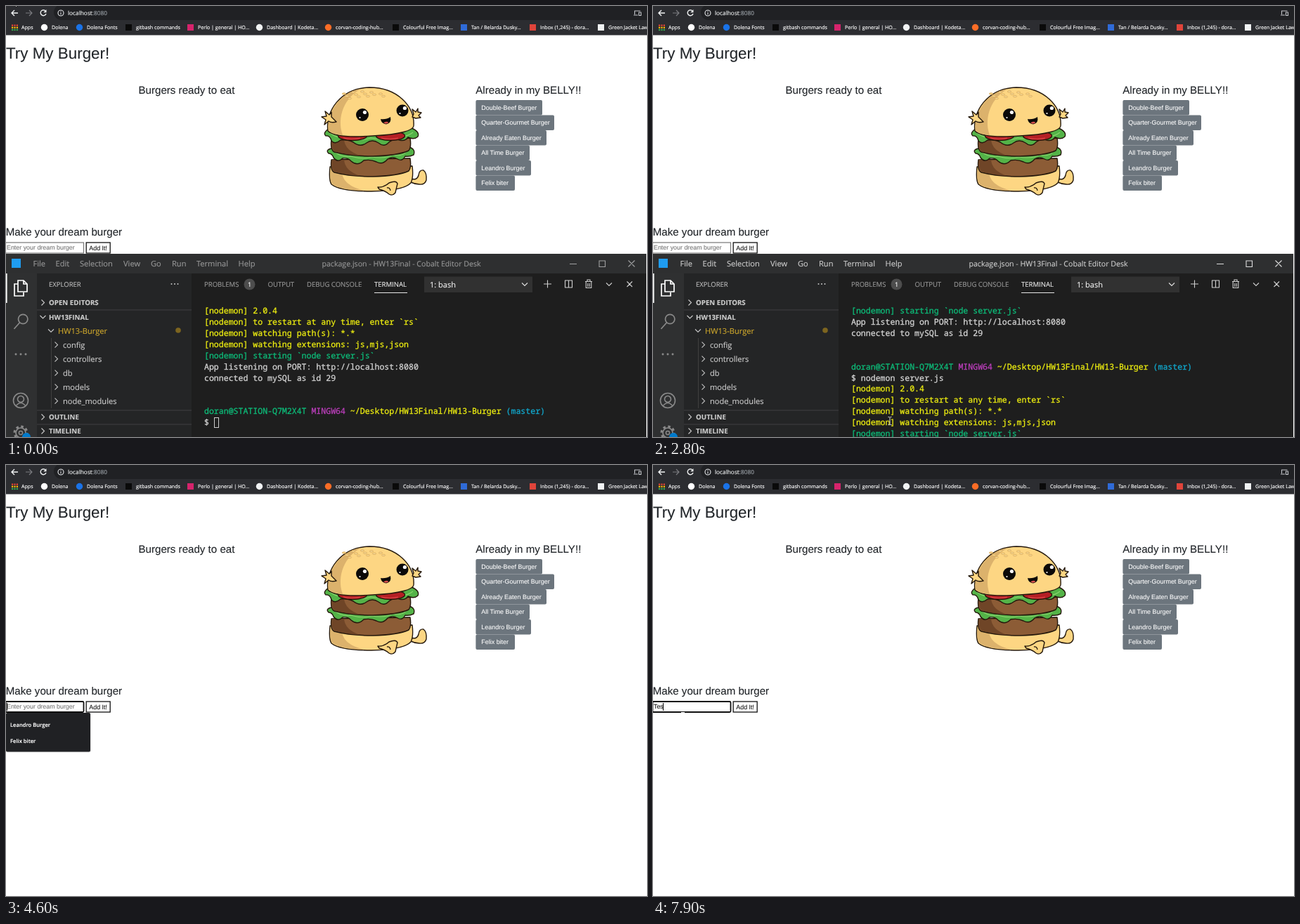
An HTML page that plays this animation: 912x614 px, repeating every 8000 ms.

```html
<!DOCTYPE html>
<html lang="en">
<head>
<meta charset="utf-8">
<title>Burger list</title>
<style>
html, body { margin: 0; width: 100%; height: 100%; overflow: hidden; background: #fff; }
svg { display: block; width: 912px; height: 614px; }
text { white-space: pre; text-rendering: geometricPrecision; }
text, tspan { fill: currentColor; stroke: currentColor; }
.a { font-family: "Liberation Sans", Arial, sans-serif; stroke-width: .1; }
.u { font-family: "Open Sans", "Noto Sans", sans-serif; stroke-width: .15; }
.m { font-family: "Noto Sans Mono", monospace; stroke-width: .3; }
.l { fill: none; stroke-width: 1.1; }
</style>
</head>
<body>
<svg id="stage" viewBox="0 0 912 614"></svg>
<script>
const text = (cls, x, y, size, color, str, more = '') =>
  `<text class="${cls}" x="${x}" y="${y}" font-size="${size}" color="${color}" ${more}>${str}</text>`;
const rect = (x, y, w, h, fill, more = '') =>
  `<rect x="${x}" y="${y}" width="${w}" height="${h}" fill="${fill}" ${more}/>`;
const dot = (x, y, r, fill, more = '') => `<circle cx="${x}" cy="${y}" r="${r}" fill="${fill}" ${more}/>`;
const line = (d, stroke, width = 1.1) => `<path class="l" d="${d}" stroke="${stroke}" style="stroke-width:${width}"/>`;
const shape = (d, fill, more = '') => `<path d="${d}" fill="${fill}" ${more}/>`;
const right = (x, y, c) => line(`M${x - 2} ${y - 4}l4 4l-4 4`, c);
const down = (x, y, c) => line(`M${x - 4} ${y - 2}l4 4l4 -4`, c);

const NAMES = ['Leandro Burger', 'Felix biter'];

function browser() {
  const marks = [
    [65, 'Dolena', 'c#fff'], [115, 'Dolena Fonts', 'c#1a73e8'], [185, 'gitbash commands', 's#0a0a0a'],
    [273, 'Perlo | general | HO...', 's#d6246c'], [371, 'Dashboard | Kodeta...', 'c#f1f3f4'],
    [469, 'corvan-coding-hub...', 'c#fc6d26'], [565, 'Colourful Free Imag...', 's#0a0a0a'],
    [662, 'Tan / Belarda Dusky...', 's#2f6bd8'], [760, 'Inbox (1,245) - dora...', 's#e0443a'],
    [857, 'Green Jacket Law', 's#f1f3f4']];
  let s = rect(0, 0, 912, 41, '#2c2d31') + rect(0, 41, 912, 1, '#8a8b8d') + rect(68, -2, 870, 22, '#202124', 'rx="11"');
  s += line('M17 10H8.5M12 6L8 10l4 4', '#f1f3f4', 1.4);
  s += line('M28 10h8.5M33 6l4 4l-4 4', '#7d7e82');
  s += line('M56.3 7.2A4 4 0 1 0 57 11', '#f1f3f4', 1.4) + shape('M57.5 5v4.2h-4.2z', '#f1f3f4');
  s += line('M74 10a4 4 0 1 0 8 0a4 4 0 1 0 -8 0M78 9.5v2.7M78 7.5v1', '#e8eaed');
  s += text('u', 88, 13.2, 8.3, '#f1f3f4', 'localhost<tspan color="#9aa0a6">:8080</tspan>');
  s += line('M894.5 12V7h8M893 13h6M900.5 9h3v4.5h-3z', '#c4c6ca');
  const hues = ['#ea4335', '#fbbc04', '#34a853'];
  for (let i = 0; i < 9; i++) {
    const row = i / 3 | 0;
    s += rect(8 + i % 3 * 3.4, 26.5 + row * 3.2, 2.2, 2.2, hues[row]);
  }
  s += text('u', 22, 33, 7.1, '#fff', 'Apps');
  for (const [x, label, icon] of marks) {
    const c = icon.slice(1);
    s += icon[0] == 'c' ? dot(x - 10.5, 30.5, 4.7, c) : rect(x - 15, 26, 9, 9, c);
    s += text('u', x, 33, 7.1, '#fff', label);
  }
  return s;
}

function burger() {
  const ink = '#24180c', tan = '#fdd683', shade = '#dcb26c';
  const o = `stroke="${ink}" stroke-width="1.4" stroke-linejoin="round" stroke-linecap="round"`;
  const patty = y => shape(`M463 ${y}Q461 ${y + 15} 467 ${y + 18}Q490 ${y + 24} 522 ${y + 24}Q558 ${y + 23} 573 ${y + 16}Q577 ${y + 11} 575 ${y - 2}Z`, '#8c5c36', o)
    + shape(`M464 ${y}Q462 ${y + 14} 468 ${y + 17}Q484 ${y + 22} 504 ${y + 23}Q482 ${y + 16} 481 ${y}Z`, '#6f4527');
  let s = shape('M576 246Q585 249 587 241Q588 233 594 234Q599 238 598 248Q596 255 588 254Q582 254 576 251Z', tan, o);
  s += shape('M461 229Q459 248 463 254Q475 264 520 264Q566 263 576 252Q580 244 578 228Z', tan, o);
  s += shape('M462 231Q460 247 464 253Q474 262 510 263Q480 256 478 238Z', shade);
  s += shape('M529 258Q537 259 545 252Q555 248 557 253Q555 261 554 266Q550 271 545 268Q539 263 531 261Z', tan, o);
  s += line('M542 259q4 -1 5 4', ink, 1.3);
  s += patty(219);
  s += shape('M463 203Q454 205 459 210Q464 210 466 216Q472 224 479 217Q487 216 491 221Q500 229 509 220Q519 218 527 222Q536 227 543 218Q550 214 557 218Q564 222 568 214Q574 215 580 212Q583 204 574 201Z', '#54b348', o);
  s += line('M468 208q10 8 22 6q18 5 30 1q20 3 30 -3q14 3 20 -5', '#8bd46f');
  s += patty(190);
  s += shape('M460 174Q450 181 455 185Q461 184 463 192Q468 198 476 191Q486 190 494 194Q504 202 513 195Q521 189 530 195Q538 202 545 194Q552 188 560 191Q568 193 572 187Q581 191 586 186Q589 179 577 174Z', '#54b348', o);
  s += line('M461 181q11 8 24 7q20 5 34 0q22 4 36 -3q14 3 24 -5', '#8bd46f');
  for (const x of [493, 547]) s += `<ellipse cx="${x}" cy="185" rx="20.5" ry="6.5" fill="#b51f24" ${o}/>` + line(`M${x - 13} 188q12 3 24 0`, '#e0484a');
  s += shape('M458 178C454 150 476 117 517 116C557 116 582 143 580 171C579 177 562 183 522 185C494 187 466 186 458 178Z', tan, o);
  s += shape('M459 177C456 152 476 122 505 118C482 130 470 158 479 184Q465 183 459 177Z', shade);
  for (let i = 0; i < 13; i++) {
    const row = i / 5 | 0, x = 481 + i % 5 * 13 + row * 4, y = 125 - 3 * Math.sin(i % 5 * .8) + row * 3.3;
    s += `<ellipse cx="${x}" cy="${y}" rx="2.7" ry="1.2" fill="#f8dc98" stroke="#d5a352" stroke-width=".7"/>`;
  }
  s += shape('M470 165Q463 167 459 164L453 169L455 162L449 158L456 157L454 150L460 155L463 151L463 158Z', tan, o);
  s += shape('M578 158L580 154L578 147L583 151L586 146L586 151L591 152L587 156L590 159L583 160Z', tan, o);
  for (const [x, y, r] of [[507, 155, 9], [564, 149, 8.5]])
    s += dot(x, y, r, '#0b0908') + dot(x + 3.4, y - 3.5, 2.6, '#fff') + dot(x - 3.5, y + 4, 1.1, '#fff');
  s += shape('M533 161Q541 162 547 158Q549 167 541 168.5Q534 168 533 161Z', '#0b0908');
  return s + shape('M537 166.5q4 -3 7.5 -.5q-4 3 -7.5 .5z', '#d7504c');
}

function page() {
  const eaten = [['Double-Beef Burger', 95], ['Quarter-Gourmet Burger', 112], ['Already Eaten Burger', 101],
    ['All Time Burger', 77], [NAMES[0], 79], [NAMES[1], 56]];
  const heading = (x, y, str, size = 15.12) => text('a', x, y, size, '#212529', str);
  let s = heading(0, 75, 'Try My Burger!', 22.4) + heading(188.5, 124.5, 'Burgers ready to eat')
    + heading(668.3, 124.5, 'Already in my BELLY!!') + heading(-.3, 326.5, 'Make your dream burger');
  eaten.forEach(([name, w], i) => {
    const y = 134 + 21.5 * i;
    s += rect(668.4, y, w - .4, 21.5, '#6c757d', 'rx="2"') + text('a', 676.3, y + 13.9, 8.95, '#fff', name);
  });
  s += burger();
  s += rect(-.5, 337, 111, 15, '#fff', 'id="field"');
  s += text('a', 1, 347.3, 8.9, '#757575', '', 'id="entry"');
  s += rect(1, 339, 1, 11, '#000', 'id="caret"');
  return s + rect(114.2, 337, 34, 15, '#fff', 'stroke="#111" stroke-width="1.3"') + text('a', 118.3, 347.5, 8.9, '#111', 'Add It!');
}

function popup() {
  return `<g id="popup">${rect(0, 353, 120.5, 56.3, '#000', 'opacity=".2" rx="2"')}${rect(0, 353, 120, 55.5, '#202124', 'rx="2"')}`
    + rect(0, 381, 120, 23, '#4a4b4e', 'id="hover"')
    + NAMES.map((n, i) => text('u', 6, 372.7 + 22.8 * i, 7.6, '#fff', n, 'font-weight="600"')).join('') + '</g>';
}

function termLines() {
  const c = (color, s) => `<tspan color="${color}">${s}</tspan>`;
  const Y = '#eded10', G = '#0dbc79';
  const run = id => ['2.0.4', 'to restart at any time, enter `rs`', 'watching path(s): *.*', 'watching extensions: js,mjs,json']
    .map(s => c(Y, '[nodemon] ' + s))
    .concat(c(G, '[nodemon] starting `node server.js`'), 'App listening on PORT: http://localhost:8080', 'connected to mySQL as id ' + id);
  const prompt = c(G, 'doran@STATION-Q7M2X4T ') + c('#bc3fbc', 'MINGW64 ') + c(Y, '~/Desktop/HW13Final/HW13-Burger ') + c('#11a8cd', '(master)');
  return [...run(29), '', '', prompt, '$ <tspan id="command">nodemon server.js</tspan>', ...run(30)];
}

const ROW = 15.87, CHAR = 6.94;

function editor() {
  const grey = '#8a8a8a', lite = '#ccc';
  let s = rect(0, 353, 911, 261, '#1e1e1e') + rect(0, 353, 911, 28, '#2e2f30') + rect(0, 381, 44, 233, '#2f3031')
    + rect(44, 381, 220, 233, '#242526') + rect(8, 360, 13, 13, '#1f9cf0');
  s += '<g id="titlebar">';
  [['File', 38.5], ['Edit', 70.5], ['Selection', 105], ['View', 167], ['Go', 206], ['Run', 236], ['Terminal', 271], ['Help', 330.5]]
    .forEach(([w, x]) => s += text('u', x, 371.3, 11.1, lite, w));
  s += text('u', 562.5, 371.2, 10.6, lite, 'package.json - HW13Final - Cobalt Editor Desk', 'text-anchor="middle"');
  s += line('M802 367.5h10M844 363h8.5v8.5h-8.5zM885.5 362.5l9 9M894.5 362.5l-9 9', '#ddd') + '</g>';

  s += rect(0, 381, 1.6, 42, '#fff');
  s += line('M17 391h8l5 5v11h-13zM17 396h-5v17h13v-5M25 391v5h5', '#fff', 1.7);
  s += line('M17.5 446a6.7 6.7 0 1 0 13.4 0a6.7 6.7 0 1 0 -13.4 0M19.5 451l-8 9', grey, 1.7);
  for (const x of [14, 21, 28]) s += dot(x, 496, 1.5, grey);
  s += line('M10.5 562a10.5 10.5 0 1 0 21 0a10.5 10.5 0 1 0 -21 0M16.5 560a4.5 4.5 0 1 0 9 0a4.5 4.5 0 1 0 -9 0M14 570q7 -9 14 0', grey, 1.6);
  const ring = (r, w, more = '') => dot(21, 608, r, 'none', `stroke="${grey}" stroke-width="${w}" ${more}`);
  s += ring(7, 1.7) + ring(9, 3, 'stroke-dasharray="3.5 3.57"') + ring(2.6, 1.5) + dot(29, 614, 6, '#007acc');

  s += text('u', 61, 399.7, 9.5, '#bbb', 'EXPLORER');
  for (const x of [235.5, 240, 244.5]) s += dot(x, 396, 1, '#c5c5c5');
  for (const y of [432.5, 575.5, 595.5]) s += rect(44, y, 220, 1, '#414142');
  [['OPEN EDITORS', 422.5], ['HW13FINAL', 443], ['OUTLINE', 585.5], ['TIMELINE', 605.5]].forEach(([w, y], i) =>
    s += (i == 1 ? down : right)(52.5, y, lite) + text('u', 61, y + 3.6, 9.75, lite, w, 'font-weight="700"'));
  s += down(64, 462.5, '#c5c5c5') + text('u', 74, 466.5, 11.1, '#cca62c', 'HW13-Burger') + dot(245, 462, 3.8, '#7d651f');
  s += rect(64, 473, 1, 100, '#404040');
  ['config', 'controllers', 'db', 'models', 'node_modules'].forEach((w, i) =>
    s += right(71.5, 482.7 + 20 * i, '#c5c5c5') + text('u', 81, 486.7 + 20 * i, 11.1, lite, w));

  [['PROBLEMS', 282], ['OUTPUT', 372.5], ['DEBUG CONSOLE', 428], ['TERMINAL', 524]].forEach(([w, x], i) =>
    s += text('u', x, 399.8, 9.55, i == 3 ? '#e7e7e7' : '#969696', w));
  s += dot(346.5, 396.5, 8, '#4d4d4d') + text('u', 346.5, 399.8, 9, '#fff', '1', 'text-anchor="middle"');
  s += rect(524, 408, 47, 1, '#e7e7e7') + rect(595, 385.5, 154, 22.5, '#313131') + text('u', 603, 400.5, 11, '#f0f0f0', '1: bash');
  s += down(738, 396.5, '#e0e0e0') + down(858, 396.5, lite);
  s += line('M770.5 390.5v11M765 396h11M795.5 391h10v10h-10zM800.5 391v10M883.5 392.5l7.5 7.5M891 392.5l-7.5 7.5', '#d0d0d0');
  s += line('M824 392.5h10M827 392v-2h4v2M825.2 393v8.5h7.6v-8.5M827.8 395v5M830.2 395v5', '#d0d0d0');

  s += '<clipPath id="view"><rect x="264" y="427" width="647" height="187"/></clipPath><g clip-path="url(#view)"><g id="log">'
    + termLines().map((l, i) => text('m', 282, 438.3 + ROW * i, CHAR / .6, '#d4d4d4', l)).join('')
    + '</g>' + rect(0, 0, CHAR, 15, '#ccc', 'id="block"') + '</g>';
  return s;
}

const stage = document.getElementById('stage');
stage.innerHTML = rect(0, 0, 912, 614, '#fff') + page() + browser() + `<g id="editor">${editor()}</g>` + popup()
  + rect(40, 352, 5, 1.2, '#fff', 'id="trace"')
  + '<path id="arrow" d="M0 0V10L2.3 7.9L4 11.6L5.6 11L4 7.3H7.2Z" fill="#fff" stroke="#000" stroke-width=".8"/>'
  + '<path id="beam" d="M-2.5 -5.5h2M.5 -5.5h2M0 -5v10.5M-2.5 5.5h2M.5 5.5h2" fill="none" stroke-width="1"/>';

const $ = id => document.getElementById(id);
const show = (id, on) => $(id).style.display = on ? '' : 'none';
const set = (id, attrs) => { for (const k in attrs) $(id).setAttribute(k, attrs[k]); };
const outRows = [...$('log').children].slice(11);

const clamp = p => Math.max(0, Math.min(1, p));
const mix = (a, b, p) => a.map((v, i) => v + (b[i] - v) * p);
const curve = (a, c, b, p) => mix(mix(a, c, p), mix(c, b, p), p);

// Pointer position, or null while it is hidden
function pointer(t) {
  const shell = [337, 591], field = [79, 342], pick = [61, 388];
  if (t < 3400) {
    const p = clamp((t - 200) / 800);
    return mix([10, -10], shell, p * p * (3 - 2 * p));
  }
  if (t < 4300) return curve(shell, [-110, 180], field, (t - 3300) / 900);
  if (t < 5000 || t >= 7500) return null;
  if (t < 6300) return mix([76, 345], pick, clamp((t - 4900) / 400));
  return mix(pick, [42, 347], clamp((t - 6200) / 300));
}

function draw(ms) {
  const t = Math.floor(ms / 100) * 100, editing = t < 4600;
  const focused = t >= 1100;
  show('editor', editing);
  set('titlebar', { opacity: focused ? 1 : .65 });
  show('command', t >= 1700);
  set('log', { transform: `translate(0 ${-ROW * (t < 2800 ? 0 : t < 3100 ? 4 : 7)})` });
  outRows.forEach(r => r.style.display = t >= 2800 ? '' : 'none');
  const row = t < 2500 ? 10 : 11, col = t < 1700 ? 2 : t < 2500 ? 20 : 0;
  show('block', t < 2800);
  set('block', focused
    ? { x: 282 + CHAR * col, y: 427.3 + ROW * row, width: CHAR, height: 15, fill: '#ccc', stroke: 'none' }
    : { x: 296.5, y: 586.5, width: 6, height: 14, fill: 'none', stroke: '#ccc' });

  const pos = pointer(t);
  const inField = pos && pos[0] < 111 && pos[1] > 336 && pos[1] < 353;
  const inShell = pos && editing && pos[0] > 264 && pos[1] > 427;
  const pick = !editing && pos && pos[1] >= 358 ? (pos[1] < 381 ? 0 : 1) : -1;
  show('arrow', pos && !inField && !inShell);
  show('beam', inField || inShell);
  if (pos) for (const id of ['arrow', 'beam']) set(id, { transform: `translate(${pos[0]} ${pos[1]})` });
  set('beam', { stroke: inShell ? '#ddd' : '#222' });

  const typed = t >= 7500 ? 'Tes'.slice(0, t < 7800 ? 1 : t < 7900 ? 2 : 3) : '';
  const value = typed || NAMES[pick] || '';
  $('entry').textContent = value || 'Enter your dream burger';
  set('entry', { color: value ? '#111' : '#757575' });
  set('field', editing ? { stroke: '#767676', 'stroke-width': 1.2, rx: 0 } : { stroke: '#101010', 'stroke-width': 1.8, rx: 1.5 });
  show('caret', !editing && !(t >= 5500 && t < 6000) && !(t >= 6500 && t < 7100));
  set('caret', { x: typed ? Math.round(.5 + $('entry').getComputedTextLength()) : 1 });
  show('popup', !editing && !typed);
  show('hover', pick >= 0);
  set('hover', { y: 358 + 23 * Math.max(0, pick) });
  show('trace', typed);
}

const start = performance.now();
function tick() {
  draw((performance.now() - start) % 8000);
  requestAnimationFrame(tick);
}
tick();
</script>
</body>
</html>
```
